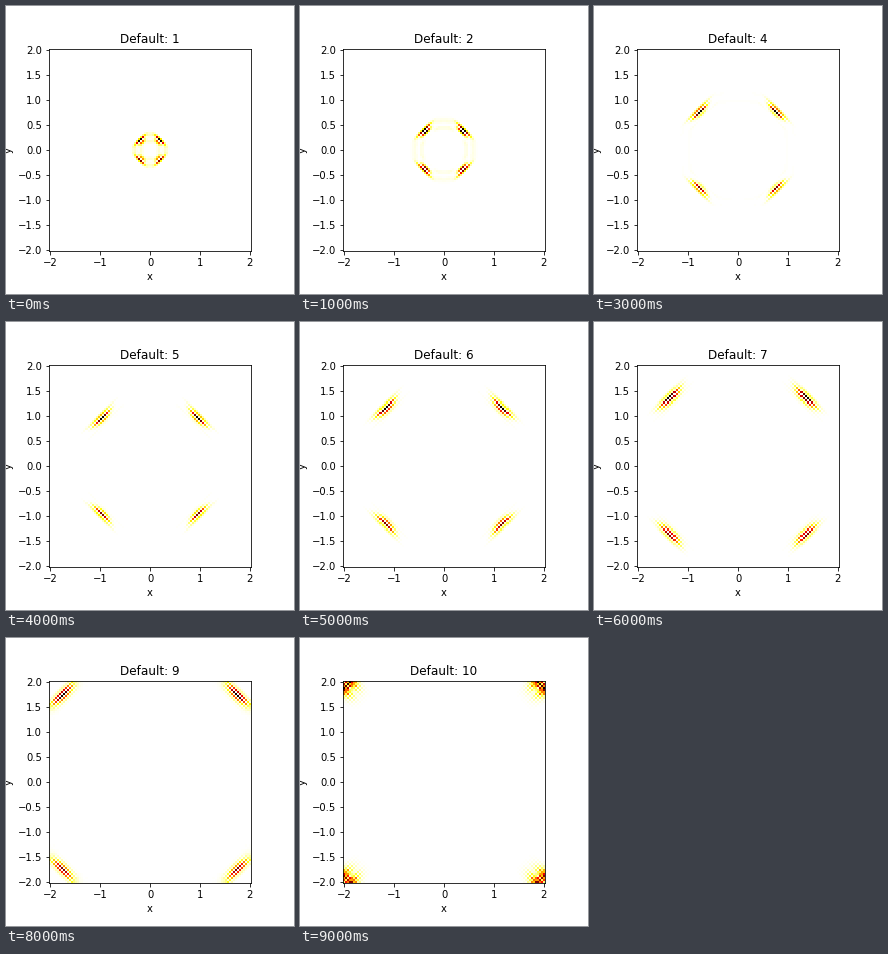
Animation, 288 px wide and 288 px high, one loop 10000 ms. Source, as a matplotlib script:

```python
import numpy as np
import matplotlib.pyplot as plt
from matplotlib.animation import FuncAnimation

SIZE = 100          # lattice points per side
STEPS = 10          # time steps between two pictures
PICTURES = 10
TILT = 0.07         # small spin along +y

grid = np.linspace(-2, 2, SIZE)
dx = grid[1] - grid[0]
dt = 0.03
MU = dt / dx


def start_state():
    up = np.zeros((SIZE, SIZE), complex)
    mid = SIZE // 2
    up[mid - 1:mid + 1, mid - 1:mid + 1] = 1
    return up, 1j * TILT * up


def neighbours(f):
    """East, west, north and south neighbours on a periodic lattice."""
    return (np.roll(f, -1, 1), np.roll(f, 1, 1),
            np.roll(f, -1, 0), np.roll(f, 1, 0))


def mean_and_slopes(f):
    e, w, n, s = neighbours(f)
    return (e + w + n + s) / 4, (e - w) / 2, (n - s) / 2


def step(up, down):
    """Lax-Friedrichs step of the massless Dirac equation."""
    up_mean, up_x, up_y = mean_and_slopes(up)
    down_mean, down_x, down_y = mean_and_slopes(down)
    return (up_mean - MU * (down_x - 1j * down_y),
            down_mean - MU * (up_x + 1j * up_y))


def evolve():
    up, down = start_state()
    densities = []
    for _ in range(PICTURES):
        for _ in range(STEPS):
            up, down = step(up, down)
        densities.append(abs(up) ** 2 + abs(down) ** 2)
    return densities


densities = evolve()

fig, ax = plt.subplots(figsize=(4, 4), dpi=72)
fig.subplots_adjust(left=0.15, right=0.85, bottom=0.15, top=0.85)
mesh = ax.pcolormesh(grid, grid, densities[0], cmap="hot_r", shading="nearest")
ax.set_aspect("equal")
ax.set_xlabel("x")
ax.set_ylabel("y")
title = ax.set_title("Default: 1")


def draw(i):
    density = densities[i]
    mesh.set_array(density)
    mesh.set_clim(0, density.max())
    title.set_text(f"Default: {i + 1}")
    return mesh, title


anim = FuncAnimation(fig, draw, frames=PICTURES, interval=1000,
                     repeat=True, repeat_delay=0, blit=False)
plt.show()
```
